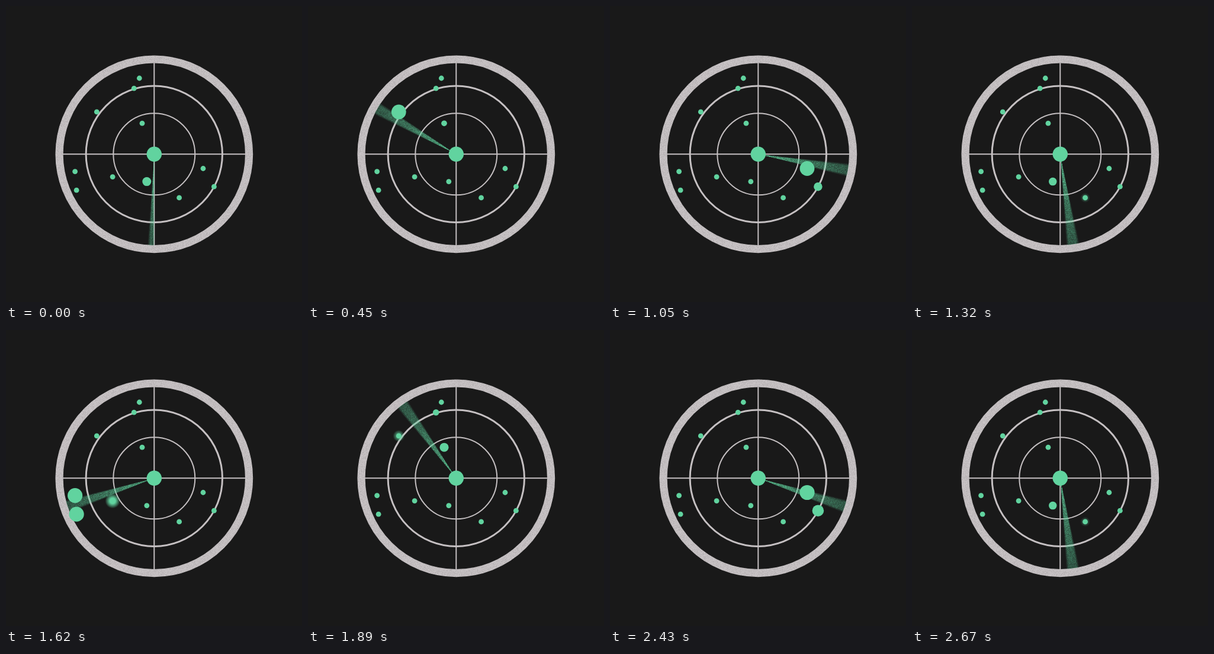
Recreate the animation shown at these times as an HTML page with a canvas. Size 500 by 500 pixels, loop 2700 ms.

```html
<!DOCTYPE html>
<html lang="en">
<head>
<meta charset="utf-8">
<title>Radar</title>
<style>
html, body { margin: 0; width: 100%; height: 100%; overflow: hidden; background: #191919; }
canvas { display: block; width: 500px; height: 500px; }
</style>
</head>
<body>
<canvas id="stage" width="500" height="500"></canvas>
<script>
const SIZE = 500, C = 250.3, TAU = Math.PI * 2, DEG = Math.PI / 180;
const LOOP = 2700, STEP = 30, TURN_STEPS = 45;
const BACK = '#191919', GREY = '#c5c0c2', GREEN = '#61d39f';
const BEAM_HALF = 3.7, BEAM_LENGTH = 154;

const ctx = document.getElementById('stage').getContext('2d');

// x, y, and how many degrees the pulse lags behind the sweep
const blips = [
  [225.3, 122, 24], [216.2, 139.2, 16], [153.3, 178.9, 0], [230, 198.2, 0],
  [116.6, 279.6, 0], [119.1, 311.2, 0], [180.1, 288.6, 0], [237.8, 296.6, 0],
  [333, 274.5, 0], [351.4, 305.2, 0], [292.6, 323.9, 0]
].map(([x, y, lag]) => ({ x, y, angle: Math.atan2(y - C, x - C) / DEG + lag }));

// degrees from sweep to blip, radius of the pulse
const growth = [[-42, 4.4], [-22, 6.9], [-14, 7.6], [-6, 12.6], [8, 12.6], [23, 7]];

function makeCanvas(size) {
  const canvas = document.createElement('canvas');
  canvas.width = canvas.height = size;
  return canvas;
}

function makeRandom(seed) {
  return () => {
    seed = (seed + 0x6d2b79f5) | 0;
    let n = Math.imul(seed ^ (seed >>> 15), 1 | seed);
    n = (n + Math.imul(n ^ (n >>> 7), 61 | n)) ^ n;
    return ((n ^ (n >>> 14)) >>> 0) / 4294967296;
  };
}

function makeNoise(seed, strength, twoTone) {
  const tile = makeCanvas(256), g = tile.getContext('2d');
  const image = g.createImageData(256, 256), random = makeRandom(seed);
  for (let i = 0; i < image.data.length; i += 4) {
    const shade = twoTone && random() > 0.5 ? 255 : 0;
    image.data.set([shade, shade, shade, random() * strength * 255], i);
  }
  g.putImageData(image, 0, 0);
  return ctx.createPattern(tile, 'repeat');
}

const ringGrain = makeNoise(7, 0.09, true);
const beamGrain = makeNoise(19, 0.5, false);
const beam = makeCanvas(SIZE), bctx = beam.getContext('2d');

function fillGrain(g, pattern, frame) {
  const dx = (frame * 97) % 256, dy = (frame * 59) % 256;
  g.save();
  g.translate(-dx, -dy);
  g.fillStyle = pattern;
  g.fillRect(dx, dy, SIZE, SIZE);
  g.restore();
}

function disc(x, y, r, fill) {
  ctx.fillStyle = fill;
  ctx.beginPath();
  ctx.arc(x, y, r, 0, TAU);
  ctx.fill();
}

function ring(r, width) {
  ctx.lineWidth = width;
  ctx.beginPath();
  ctx.arc(C, C, r, 0, TAU);
  ctx.stroke();
}

function drawGrid(frame) {
  ctx.strokeStyle = GREY;
  ctx.lineWidth = 2;
  ctx.beginPath();
  ctx.moveTo(C - 156, C);
  ctx.lineTo(C + 156, C);
  ctx.moveTo(C, C - 156);
  ctx.lineTo(C, C + 156);
  ctx.stroke();
  ring(69, 2);
  ring(115.2, 3);
  ring(160.3, 13.2);

  ctx.save();
  ctx.beginPath();
  ctx.arc(C, C, 167, 0, TAU);
  ctx.arc(C, C, 153.8, 0, TAU, true);
  ctx.clip();
  fillGrain(ctx, ringGrain, frame);
  ctx.restore();
}

function drawBeam(sweep, frame) {
  const from = Math.max(90, sweep - BEAM_HALF - 0.5), to = sweep + BEAM_HALF + 0.5;
  const start = sweep - 10;
  const fan = bctx.createConicGradient(start * DEG, C, C);
  const stop = (offset, alpha) =>
    fan.addColorStop((10 + offset) / 360, `rgba(97,211,159,${alpha})`);
  stop(-BEAM_HALF - 0.5, 0);
  stop(-BEAM_HALF + 1.2, 0.95);
  stop(BEAM_HALF - 1.2, 0.95);
  stop(BEAM_HALF + 0.5, 0);

  bctx.globalCompositeOperation = 'source-over';
  bctx.clearRect(0, 0, SIZE, SIZE);
  bctx.fillStyle = fan;
  bctx.beginPath();
  bctx.moveTo(C, C);
  bctx.arc(C, C, BEAM_LENGTH, from * DEG, to * DEG);
  bctx.fill();

  const fade = bctx.createRadialGradient(C, C, 0, C, C, BEAM_LENGTH);
  fade.addColorStop(0, 'rgba(0,0,0,1)');
  fade.addColorStop(0.3, 'rgba(0,0,0,.88)');
  fade.addColorStop(0.6, 'rgba(0,0,0,.65)');
  fade.addColorStop(1, 'rgba(0,0,0,.46)');
  bctx.globalCompositeOperation = 'destination-in';
  bctx.fillStyle = fade;
  bctx.fillRect(0, 0, SIZE, SIZE);
  bctx.globalCompositeOperation = 'destination-out';
  fillGrain(bctx, beamGrain, frame);
  ctx.drawImage(beam, 0, 0);
}

function pulseRadius(offset) {
  const i = growth.findIndex(([at]) => at > offset);
  if (i < 1) return 0;
  const [a, ra] = growth[i - 1], [b, rb] = growth[i];
  return ra + (rb - ra) * (offset - a) / (b - a);
}

function drawBlip({ x, y, angle }, sweep) {
  const offset = ((sweep - angle + 180) % 360 + 360) % 360 - 180;
  const r = pulseRadius(offset);
  if (r && offset <= 8) {
    disc(x, y, r, GREEN);
  } else if (r) {
    const left = (23 - offset) / 15;
    const glow = ctx.createRadialGradient(x, y, r * 0.4, x, y, r * 1.1);
    glow.addColorStop(0, `rgba(97,211,159,${Math.min(1, 0.3 + left)})`);
    glow.addColorStop(1, 'rgba(97,211,159,0)');
    disc(x, y, r * 1.1, glow);
  }
  disc(x, y, 4.4, GREEN);
}

function draw(now) {
  const frame = Math.floor((now % LOOP) / STEP);
  const sweep = 90 + (frame % TURN_STEPS) * 360 / TURN_STEPS;
  ctx.fillStyle = BACK;
  ctx.fillRect(0, 0, SIZE, SIZE);
  drawGrid(frame);
  drawBeam(sweep, frame);
  blips.forEach(blip => drawBlip(blip, sweep));
  disc(C, C, 12.7, GREEN);
}

let origin;
function tick(now) {
  origin ??= now;
  draw(Math.max(0, now - origin));
  requestAnimationFrame(tick);
}
draw(0);
requestAnimationFrame(tick);
</script>
</body>
</html>
```
